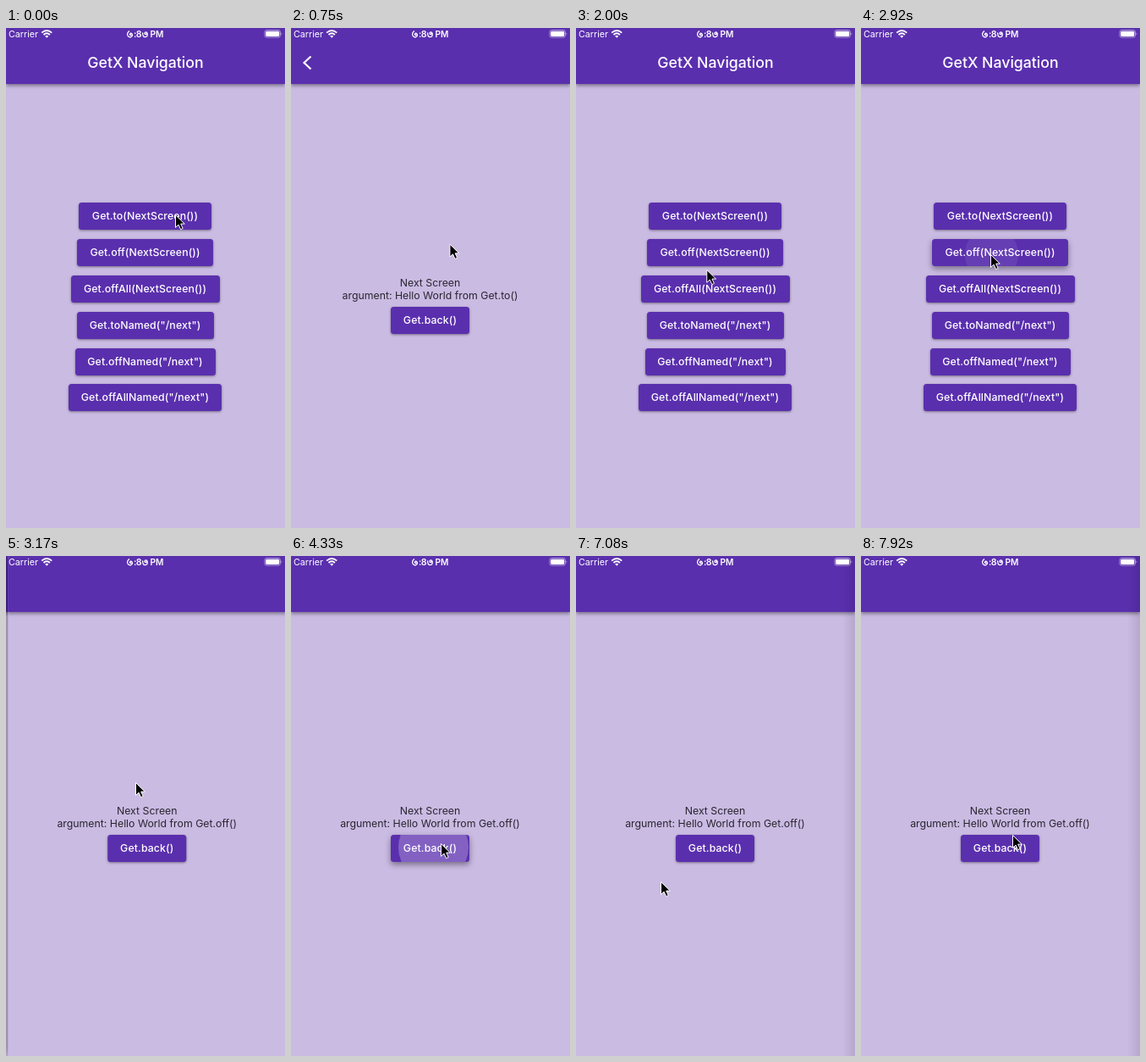
These frames come from a looping animation (330 by 590 pixels, 8 s). An HTML page:

```html
<!DOCTYPE html>
<html lang="en">
<head>
<meta charset="utf-8">
<title>Navigation demo</title>
<style>
  html, body { margin: 0; width: 100%; height: 100%; overflow: hidden; }
  #stage { position: relative; width: 330px; height: 590px; overflow: hidden;
    font: 12.3px/15px Inter, "Open Sans", sans-serif; color: #29262f; }
  #stage > *, .page > * { position: absolute; }
  .page { width: 330px; height: 590px; background: #cabbe3; }
  #next { box-shadow: 0 0 11px rgba(0,0,0,.55); }
  header { width: 330px; height: 66px; background: #5a2fae; color: #fff;
    box-shadow: 0 1.5px 4px rgba(0,0,0,.42); text-align: center;
    font-size: 17.7px; font-weight: 500; line-height: 82px; }
  .line { width: 329px; text-align: center; white-space: nowrap; }
  .button { height: 32px; border-radius: 3.5px; overflow: hidden; background: #5a2fae;
    color: #fff; text-align: center; line-height: 32px; font-weight: 500;
    letter-spacing: .12px; white-space: nowrap;
    box-shadow: 0 1px 3px rgba(0,0,0,.42); }
  .button.pressed { box-shadow: 0 3px 7px rgba(0,0,0,.42); }
  .button i { position: absolute; border-radius: 50%; background: #fff; }
  .button span { position: relative; }
  #edge { right: 0; width: 15px; height: 590px;
    background: linear-gradient(90deg, transparent, rgba(0,0,0,.1)); }
  svg { overflow: visible; left: 0; top: 0; }
  #status { font: 10.7px Inter, sans-serif; }
</style>
</head>
<body>
<div id="stage">
  <div class="page" id="home"><header>GetX Navigation</header></div>
  <div class="page" id="next">
    <header></header>
    <svg id="arrow" width="30" height="60"><path d="M23.5 33.5 15.5 41l8 7.5" fill="none" stroke="#fff" stroke-width="2.2"/></svg>
    <div class="line" style="top:293px">Next Screen</div>
    <div class="line" id="argument" style="top:308px"></div>
  </div>
  <div id="edge"></div>
  <svg id="status" width="330" height="15" fill="#fff">
    <text x="3" y="11">Carrier</text>
    <g fill="none" stroke="#fff" stroke-width="1.9">
      <path d="M42.2 5.6Q48.2 .2 54.2 5.6M44.5 8Q48.2 4.7 51.9 8"/>
    </g>
    <path d="M46.2 9.6Q48.2 7.8 50.2 9.6L48.2 11.7z"/>
    <g fill="none" stroke="#fff" stroke-width="1.3" stroke-linecap="round">
      <path d="M145.6 3.8Q142.8 6 144 9Q145.2 11.3 147.6 10.6Q150.4 9.3 149 7Q147.4 5.4 146.5 7.2Q146.4 8.6 148 8.3"/>
      <path d="M161.6 6Q161.6 10.6 164.6 10.7Q167.6 10.2 167.2 6.8Q166.4 4 164.4 5.2Q163.2 7.4 165.2 7.6Q166.4 7.4 166.2 6"/>
    </g>
    <text x="151" y="11" font-weight="600">:</text>
    <text x="153.8" y="11" font-weight="600">8</text>
    <text x="170.5" y="11" font-weight="600" font-size="10.2">PM</text>
    <rect x="306" y="2.5" width="18.5" height="8.6" rx="2.4" fill="none" stroke="#fff" stroke-opacity=".55" stroke-width=".9"/>
    <rect x="307.2" y="3.7" width="16.1" height="6.2" rx="1.4"/>
    <path d="M325.6 5.2q1.6 1.6 0 3.2z" fill-opacity=".7"/>
  </svg>
  <svg id="cursor" width="14" height="20"><path d="M.5 .5V15.4L4 12.1 6.6 17.7 9.2 16.5 6.7 11.1H11.3z" fill="#000" stroke="#fff" stroke-width="1"/></svg>
</div>
<script>
const $ = id => document.getElementById(id);
const WIDTH = 330, LOOP = 8000, FPS = 12, CENTER = 164.5;
const clamp = v => Math.min(1, Math.max(0, v));

function bezier(x1, y1, x2, y2) {
  const at = (a, b, s) => 3 * a * s * (1 - s) ** 2 + 3 * b * s * s * (1 - s) + s ** 3;
  return x => {
    if (x <= 0 || x >= 1) return clamp(x);
    let low = 0, high = 1;
    for (let i = 0; i < 24; i++) {
      const mid = (low + high) / 2;
      if (at(x1, x2, mid) < x) low = mid; else high = mid;
    }
    return at(y1, y2, low);
  };
}
const slideEase = bezier(.35, .91, .33, .97);
const rippleEase = bezier(.25, .1, .25, 1);

function addButton(page, label, width, top) {
  const el = document.createElement('div');
  el.className = 'button';
  el.style.cssText = `left:${CENTER - width / 2}px;top:${top}px;width:${width}px`;
  const ripple = document.createElement('i'), text = document.createElement('span');
  text.textContent = label;
  el.append(ripple, text);
  $(page).append(el);
  return { el, ripple, width };
}

const homeButtons = [
  ['Get.to(NextScreen())', 157], ['Get.off(NextScreen())', 161],
  ['Get.offAll(NextScreen())', 176], ['Get.toNamed("/next")', 162],
  ['Get.offNamed("/next")', 166], ['Get.offAllNamed("/next")', 181],
].map(([label, width], i) => addButton('home', label, width, 206.4 + i * 42.8));
const backButton = addButton('next', 'Get.back()', 93, 328.5);

// Each tap: button, time, x and y inside the button
const taps = [
  [homeButtons[0], 62, 114, 15], [backButton, 1492, 40, 8],
  [homeButtons[1], 2895, 70, 18], [backButton, 4245, 59, 13],
];

// Pointer stops: time, x, y
const path = [
  [0, 200, 220], [420, 200, 220], [1330, 158, 336], [1500, 158, 334],
  [1583, 157, 326], [2250, 153, 266], [2330, 153, 268], [2420, 153, 267],
  [3250, 153, 267], [4170, 177, 339], [4580, 177, 339], [4750, 205, 368],
  [5000, 243, 301], [6580, 0, 200], [6750, 16, 10], [7080, 100, 384],
  [7330, 176, 355], [7580, 210, 348], [7917, 179, 329], [LOOP, 179, 329],
];

function pointerAt(t) {
  const i = path.findIndex(stop => stop[0] > t);
  const [t0, x0, y0] = path[i - 1], [t1, x1, y1] = path[i];
  const p = (t - t0) / (t1 - t0), k = p * p * (3 - 2 * p);
  return [x0 + (x1 - x0) * k, y0 + (y1 - y0) * k];
}

function slideAt(t) {
  const moved = (start, duration) => slideEase((t - start) / duration);
  if (t < 1516) return WIDTH * (1 - moved(84, 285));
  if (t < 2918) return WIDTH * moved(1516, 300);
  return WIDTH * (1 - moved(2918, 285));
}

function drawRipple([button, start, x, y], t) {
  const age = t - start;
  if (age < 0 || age > 600) return;
  const { el, ripple, width } = button;
  const k = rippleEase(age / 225), full = Math.hypot(width, 32) / 2 + 5;
  const r = full * (.3 + .7 * k);
  const cx = x + (width / 2 - x) * k, cy = y + (16 - y) * k;
  const alpha = .24 * clamp(age / 75) * clamp((600 - age) / 375);
  el.classList.add('pressed');
  ripple.style.cssText =
    `left:${cx - r}px;top:${cy - r}px;width:${2 * r}px;height:${2 * r}px;opacity:${alpha}`;
}

function draw(t) {
  const slide = slideAt(t), first = t < 2600;
  $('next').style.transform = `translateX(${slide}px)`;
  $('next').style.visibility = slide > WIDTH - .5 ? 'hidden' : 'visible';
  $('arrow').style.display = first ? '' : 'none';
  $('argument').textContent = `argument: Hello World from Get.${first ? 'to' : 'off'}()`;
  $('edge').style.opacity = t > 4550 ? 1 : 0;

  for (const { el, ripple } of [...homeButtons, backButton]) {
    el.classList.remove('pressed');
    ripple.style.opacity = 0;
  }
  taps.forEach(tap => drawRipple(tap, t));

  const [x, y] = pointerAt(t);
  $('cursor').style.transform = `translate(${x}px,${y}px)`;
  $('cursor').style.display = t > 5910 && t < 6580 ? 'none' : '';
}

function tick() {
  const t = performance.now() % LOOP;
  draw(Math.floor((t + 5) * FPS / 1000) * 1000 / FPS % LOOP);
  requestAnimationFrame(tick);
}
tick();
</script>
</body>
</html>
```
